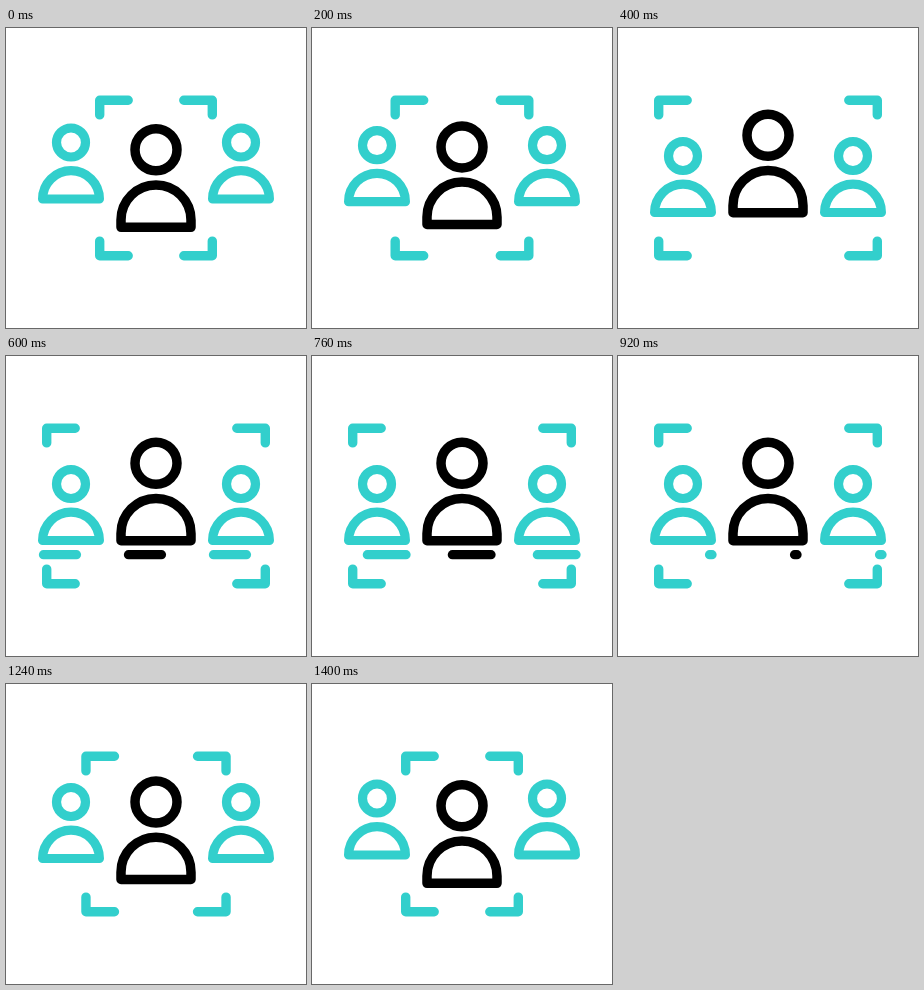
Animation of 300x300 px, one loop 1480 ms. Source, as an HTML page with a canvas:

```html
<!DOCTYPE html>
<html lang="en">
<head>
<meta charset="utf-8">
<title>Group focus</title>
<style>
  html, body { margin: 0; width: 100%; height: 100%; overflow: hidden; background: #fff; }
  canvas { display: block; width: 300px; height: 300px; }
</style>
</head>
<body>
<canvas id="stage"></canvas>
<script>
const LOOP = 1480, STEP = 40, SIZE = 300;
const TEAL = '#32cfcc', BLACK = '#000';

const canvas = document.getElementById('stage');
const ratio = window.devicePixelRatio || 1;
canvas.width = canvas.height = SIZE * ratio;
const ctx = canvas.getContext('2d');
ctx.scale(ratio, ratio);
ctx.lineCap = ctx.lineJoin = 'round';

const ease = (t, start, end) => {
  const u = Math.min(1, Math.max(0, (t - start) / (end - start)));
  return u * u * (3 - 2 * u);
};

function stroke(color, width, trace) {
  ctx.strokeStyle = color;
  ctx.lineWidth = width;
  ctx.beginPath();
  trace();
  ctx.stroke();
}

// Head ring over a domed torso; `rise` is the straight part below the dome.
function person({ x, headY, headR, baseY, bodyR, rise, color, width }, shift) {
  stroke(color, width, () => ctx.arc(x, headY + shift, headR, 0, Math.PI * 2));
  stroke(color, width, () => {
    const y = baseY + shift;
    ctx.moveTo(x - bodyR, y);
    ctx.arc(x, y - rise, bodyR, Math.PI, 0);
    ctx.lineTo(x + bodyR, y);
    ctx.closePath();
  });
}

function underline(x, color, from, to) {
  if (to <= 0 || from >= 1) return;
  const left = x - 27.5, length = 56.5, y = 198.7;
  stroke(color, 9.3, () => {
    ctx.moveTo(left + length * from, y);
    ctx.lineTo(left + length * to, y);
  });
}

function brackets(halfWidth) {
  for (const sx of [-1, 1]) {
    for (const sy of [-1, 1]) {
      const x = 150 + sx * halfWidth, y = 150 + sy * 77.7;
      stroke(TEAL, 9.4, () => {
        ctx.moveTo(x - sx * 28.5, y);
        ctx.lineTo(x, y);
        ctx.lineTo(x, y - sy * 14.6);
      });
    }
  }
}

const leader = { x: 150, headY: 121.8, headR: 21, baseY: 199.3, bodyR: 35, rise: 7.3, color: BLACK, width: 9.5 };
const member = { headY: 114.5, headR: 14.5, baseY: 171, bodyR: 28.4, rise: 0, color: TEAL, width: 9.2 };

function draw(t) {
  const spread = ease(t, 120, 400) - ease(t, 920, 1400);
  const lineEnd = ease(t, 400, 760);
  const lineStart = ease(t, 640, 960);

  ctx.fillStyle = '#fff';
  ctx.fillRect(0, 0, SIZE, SIZE);

  brackets(56.3 + 53 * spread);
  for (const x of [65, 235]) {
    person({ ...member, x }, 13.5 * spread);
    underline(x, TEAL, lineStart, lineEnd);
  }
  person(leader, -14.6 * spread);
  underline(150, BLACK, lineStart, lineEnd);
}

const origin = performance.now();
function tick() {
  const elapsed = (performance.now() - origin) % LOOP;
  draw(Math.floor(elapsed / STEP) * STEP);
  requestAnimationFrame(tick);
}
tick();
</script>
</body>
</html>
```
